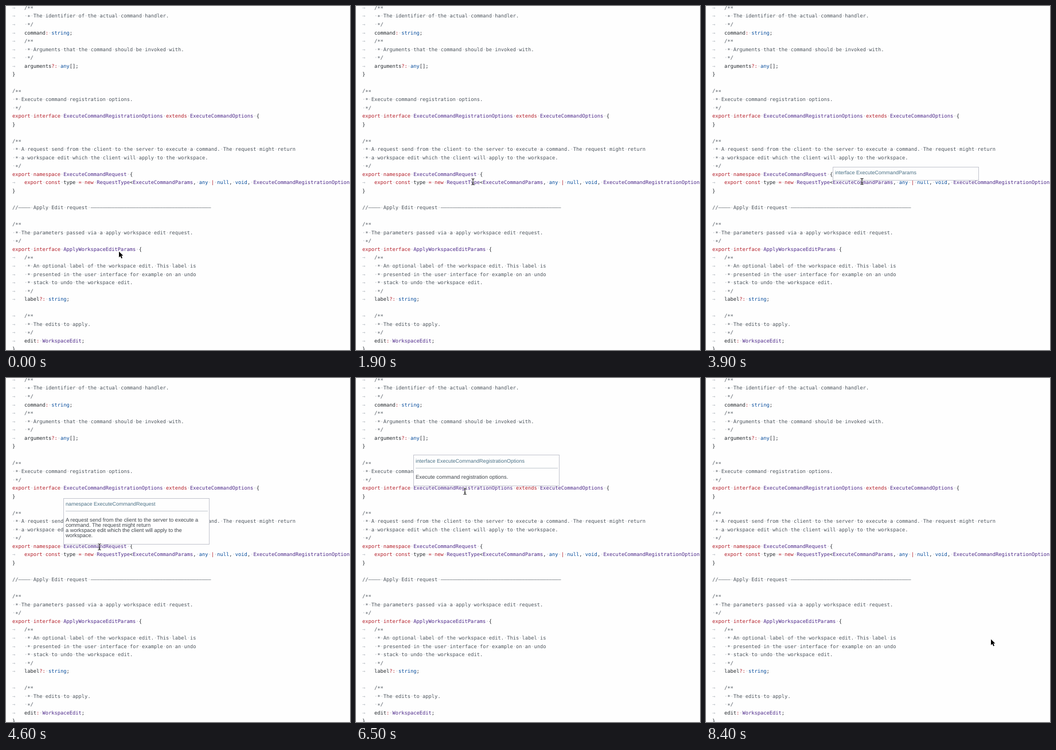
Write an HTML page with a canvas that moves like this. It is 600x601 px and loops after 8.5 s.

```html
<!DOCTYPE html>
<html lang="en">
<head>
<meta charset="utf-8">
<title>Code hovers</title>
<style>
html, body { margin: 0; width: 100%; height: 100%; overflow: hidden; background: #fefefe; }
canvas { display: block; width: 100vw; height: 100vh; }
</style>
</head>
<body>
<canvas id="stage"></canvas>
<script>
const W = 600, H = 601, LOOP = 8500, STEP = 100;
const LEFT = 11, CHAR = 5.255, LINE = 14.55, BASE = 5.9;
const MONO = '8.73px "DejaVu Sans Mono", monospace';
const SANS = '"Liberation Sans", Arial, sans-serif';
const INK = '#24292e', COMMENT = '#4c545c', RED = '#b31d28', BLUE = '#044b9c',
  PURPLE = '#4c2889', FAINT = '#b4bac0';

const DASH = '—';
const code = `\t/**
\t * The identifier of the actual command handler.
\t */
\tcommand: string;
\t/**
\t * Arguments that the command should be invoked with.
\t */
\targuments?: any[];
}

/**
 * Execute command registration options.
 */
export interface ExecuteCommandRegistrationOptions extends ExecuteCommandOptions {
}

/**
 * A request send from the client to the server to execute a command. The request might return
 * a workspace edit which the client will apply to the workspace.
 */
export namespace ExecuteCommandRequest {
\texport const type = new RequestType<ExecuteCommandParams, any | null, void, ExecuteCommandRegistrationOptions>('workspace/executeCommand');
}

//${DASH.repeat(4)} Apply Edit request ${DASH.repeat(40)}

/**
 * The parameters passed via a apply workspace edit request.
 */
export interface ApplyWorkspaceEditParams {
\t/**
\t * An optional label of the workspace edit. This label is
\t * presented in the user interface for example on an undo
\t * stack to undo the workspace edit.
\t */
\tlabel?: string;

\t/**
\t * The edits to apply.
\t */
\tedit: WorkspaceEdit;
}`.split('\n');

// Hover boxes: start, end, left edge, bottom edge, heading, text lines
const tips = [
  [2100, 2700, 158, 305, 'class RequestType<P, R, E, RO>', []],
  [3500, 4100, 221, 305, 'interface ExecuteCommandParams', []],
  [4500, 5300, 100, 290.5, 'namespace ExecuteCommandRequest', [
    'A request send from the client to the server to execute a',
    'command. The request might return',
    'a workspace edit which the client will apply to the',
    'workspace.']],
  [6000, 6700, 100, 189, 'interface ExecuteCommandRegistrationOptions',
    ['Execute command registration options.']],
  [7500, 8200, 321, 189, 'interface ExecuteCommandOptions', ['Execute command options.']]
];

// Pointer path: time, x, y
const path = [
  [0, 197, 429], [1000, 197, 429], [1700, 204, 307], [2700, 204, 307],
  [3200, 272, 306.5], [4000, 272, 306.5], [4300, 163, 295], [5200, 163, 295],
  [5600, 190, 198], [6700, 190, 198], [7100, 366, 201], [7300, 366, 193],
  [8100, 366, 193], [8400, 497, 456.5]
];

const canvas = document.getElementById('stage');
const ctx = canvas.getContext('2d');

function write(text, x, y, font, color) {
  ctx.font = font;
  ctx.fillStyle = color;
  ctx.fillText(text, x, y);
}

function colorOf(token) {
  if (/^(export|interface|extends|namespace|const|new)$/.test(token)) return RED;
  if (/^(string|any|null|void)$/.test(token)) return BLUE;
  if (/^[?:|=]+$/.test(token)) return RED;
  return /^[A-Z]/.test(token) ? PURPLE : INK;
}

function drawLine(line, row) {
  const y = BASE + row * LINE;
  const isComment = /^\s*(\/|\*)/.test(line);
  let col = 0;
  for (const token of line.match(/\t|\s|\*|[?:|=]+|\w+|[^\s\w*?:|=]+/g) || []) {
    const x = LEFT + col * CHAR;
    if (token === '\t') {
      write('→', x, y, MONO, FAINT);
      col += 4;
      continue;
    }
    if (token === ' ') write('·', x, y, MONO, FAINT);
    else if (token === '*') write(token, x, y + 1.2, MONO, COMMENT);
    else write(token, x, y, MONO, isComment ? COMMENT : colorOf(token));
    col += token.length;
  }
}

function drawTip([, , left, bottom, heading, lines]) {
  const height = lines.length ? 54.75 + 8.75 * (lines.length - 1) : 24;
  const top = bottom - height;
  ctx.fillStyle = '#fefefe';
  ctx.fillRect(left, top, 255, height);
  ctx.strokeStyle = '#c3c5ce';
  ctx.lineWidth = 1;
  ctx.strokeRect(left + .5, Math.round(top) + .5, 254, Math.round(height) - 1);
  write(heading, left + 4, top + 13.4, '9px ' + SANS, '#4b7186');
  if (!lines.length) return;
  ctx.fillStyle = '#c3c9d0';
  ctx.fillRect(left + 4, Math.round(top + 22.5), 248, 1);
  lines.forEach((text, i) =>
    write(text, left + 4, top + 41.9 + i * 8.75, '9.33px ' + SANS, '#41474d'));
}

function pointerAt(t) {
  const next = path.findIndex(p => p[0] > t);
  if (next < 0) return path[path.length - 1].slice(1);
  const [t0, x0, y0] = path[next - 1], [t1, x1, y1] = path[next];
  const k = (t - t0) / (t1 - t0), ease = k * k * (3 - 2 * k);
  return [x0 + (x1 - x0) * ease, y0 + (y1 - y0) * ease];
}

function drawArrow() {
  const shape = new Path2D('M0 0V10.2L2.4 8L4.2 12L6 11.2L4.3 7.3H7.4Z');
  ctx.lineWidth = 1.4;
  ctx.lineJoin = 'round';
  ctx.strokeStyle = '#fff';
  ctx.stroke(shape);
  ctx.fillStyle = '#000';
  ctx.fill(shape);
}

function drawBeam() {
  const shape = new Path2D('M-2.6 -5.3Q0 -5.3 0 -3.8Q0 -5.3 2.6 -5.3M0 -3.8V3.8M-2.6 5.3Q0 5.3 0 3.8Q0 5.3 2.6 5.3M-1.3 2H1.3');
  for (const [width, color] of [[2.2, '#fff'], [1.1, '#111']]) {
    ctx.lineWidth = width;
    ctx.strokeStyle = color;
    ctx.stroke(shape);
  }
}

function drawPointer(t) {
  ctx.save();
  ctx.translate(...pointerAt(t));
  if (t < 1100 || (t >= 7000 && t < 7200) || t >= 8200) drawArrow();
  else drawBeam();
  ctx.restore();
}

function frame(now) {
  const t = Math.floor(now % LOOP / STEP) * STEP;
  const ratio = window.devicePixelRatio || 1;
  const w = Math.round(innerWidth * ratio), h = Math.round(innerHeight * ratio);
  if (canvas.width !== w || canvas.height !== h) {
    canvas.width = w;
    canvas.height = h;
  }
  ctx.setTransform(w / W, 0, 0, h / H, 0, 0);
  ctx.textRendering = 'geometricPrecision';
  ctx.fillStyle = '#fefefe';
  ctx.fillRect(0, 0, W, H);
  code.forEach(drawLine);
  tips.filter(tip => t >= tip[0] && t < tip[1]).forEach(drawTip);
  drawPointer(t);
  requestAnimationFrame(frame);
}
requestAnimationFrame(frame);
</script>
</body>
</html>
```
